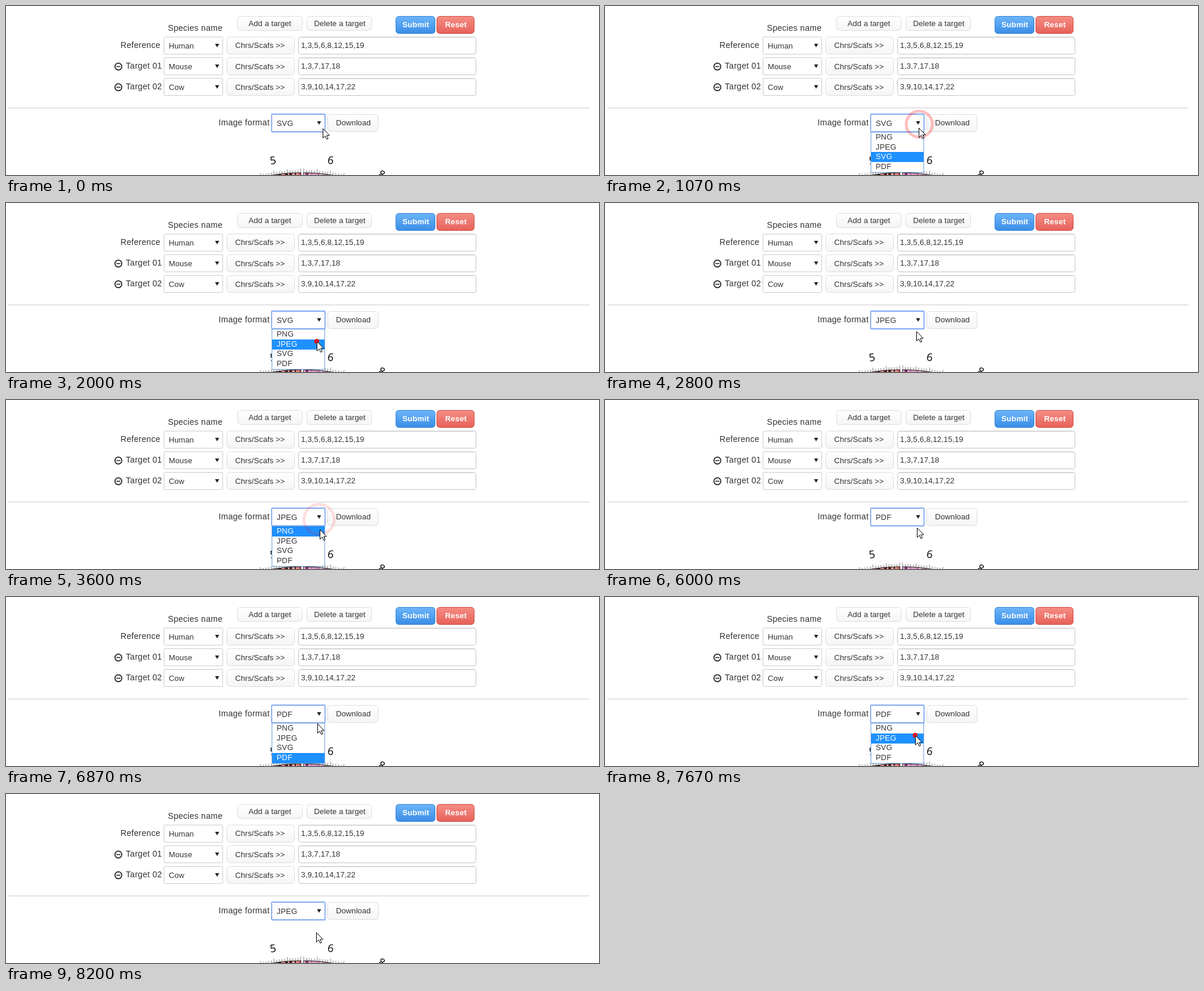
An HTML page for the animation above (8.27 s loop, 1000 by 286 pixels).

```html
<!DOCTYPE html>
<html lang="en">
<head>
<meta charset="utf-8">
<title>Image format picker</title>
<style>
  html, body { margin: 0; width: 100%; height: 100%; overflow: hidden; background: #fff; }
  svg { display: block; width: 1000px; height: 286px; }
  text { font: 13px "Liberation Sans", Arial, sans-serif; letter-spacing: .1px; fill: #333; white-space: pre; }
  .label { font-size: 14px; letter-spacing: .3px; }
  .strong { font-weight: bold; letter-spacing: .2px; fill: #fff; }
  .option { letter-spacing: .2px; }
  .chart { font: 18px "Noto Sans", "Open Sans", sans-serif; fill: #111; text-anchor: middle; }
</style>
</head>
<body>
<svg id="stage" viewBox="0 0 1000 286">
  <defs>
    <linearGradient id="plain" x2="0" y2="1"><stop stop-color="#fff"/><stop offset="1" stop-color="#f5f5f5"/></linearGradient>
    <linearGradient id="blue" x2="0" y2="1"><stop stop-color="#6cb5f9"/><stop offset="1" stop-color="#3a8de6"/></linearGradient>
    <linearGradient id="red" x2="0" y2="1"><stop stop-color="#f58d84"/><stop offset="1" stop-color="#e6625a"/></linearGradient>
  </defs>
  <g id="chart"></g>
  <g id="form"></g>
  <g id="list"></g>
  <circle id="ring" fill="none" stroke="#f00" stroke-width="5"/>
  <path id="cursor" d="M.5 .5V16.5L4.3 13L6.8 18.5L9.2 17.4L6.8 12H11.5Z" fill="#fff" stroke="#000"/>
</svg>
<script>
const byId = id => document.getElementById(id);

function add(parent, tag, attrs, content = '') {
  const node = document.createElementNS('http://www.w3.org/2000/svg', tag);
  for (const key in attrs) node.setAttribute(key, attrs[key]);
  node.textContent = content;
  parent.append(node);
  return node;
}

const chart = byId('chart'), form = byId('form'), list = byId('list');
const write = (x, y, content, cls = '') => add(form, 'text', { x, y, class: cls }, content);
const box = (x, y, width, height, rx, fill, stroke) =>
  add(form, 'rect', { x: x + .5, y: y + .5, width: width - 1, height: height - 1, rx, fill, stroke });

function button(x, y, width, height, textX, baseline, label, fill = 'url(#plain)', stroke = '#ddd', cls = '') {
  box(x, y, width, height, 5, fill, stroke);
  write(textX, baseline, label, cls);
}

const arrow = (x, y) => add(form, 'path', { d: `M${x} ${y}h7l-3.5 6z`, fill: '#222' });

// Circular chart, only its top edge is on stage
const CX = 499.5, CY = 603;
function spoke(degrees, inner, outer, stroke, width) {
  const a = degrees * Math.PI / 180, s = Math.sin(a), c = Math.cos(a);
  add(chart, 'line', { x1: CX + inner * s, y1: CY - inner * c, x2: CX + outer * s, y2: CY - outer * c, stroke, 'stroke-width': width });
}

function drawChart() {
  let seed = 7;
  const random = () => (seed = seed * 16807 % 2147483647) / 2147483647;
  const palettes = { '-1': ['#b8403f', '#e58a86', '#f0b4ae', '#3a1010', '#d0605c'], 1: ['#b0559a', '#dca0c8', '#eabcd8', '#70305f', '#d080b8'] };
  for (const side of [-1, 1]) {
    for (let a = .55; a < 9.5; a += .4) {
      spoke(side * a, 305, 321, palettes[side][Math.floor(random() * 5)], 2.4);
    }
    for (let i = 0; i < 17; i++) spoke(side * (.45 + i * .8), 321, i % 5 ? 325.5 : 328, '#777', .9);
    const x = a => CX + side * 321 * Math.sin(a), y = a => CY - 321 * Math.cos(a);
    add(chart, 'path', {
      d: `M${x(.007)} 290V${y(.007)}A321 321 0 0 ${side > 0 ? 1 : 0} ${x(.17)} ${y(.17)}`,
      fill: 'none', stroke: '#222', 'stroke-width': 1
    });
  }
  for (const [digit, degrees] of [['3', -26], ['5', -8.2], ['6', 8], ['8', 22.9]]) {
    add(chart, 'text', { class: 'chart', transform: `rotate(${degrees} ${CX} ${CY})`, x: CX, y: CY - 339 }, digit);
  }
}

function drawForm() {
  write(273, 42, 'Species name', 'label');
  button(390, 17, 110, 25, 409, 34, 'Add a target');
  button(507, 17, 110, 25, 519.5, 34, 'Delete a target');
  button(657, 17, 67, 30, 668.5, 36, 'Submit', 'url(#blue)', '#3683d6', 'strong');
  button(726, 17, 64, 30, 740.5, 36, 'Reset', 'url(#red)', '#cf4a43', 'strong');

  const rows = [
    ['Reference', 'Human', '1,3,5,6,8,12,15,19'],
    ['Target 01', 'Mouse', '1,3,7,17,18'],
    ['Target 02', 'Cow', '3,9,10,14,17,22']
  ];
  rows.forEach(([label, species, numbers], i) => {
    const y = 52 + 35 * i;
    write(i ? 202 : 193, y + 19, label, 'label');
    if (i) add(form, 'path', { d: `M183.7 ${y + 15.5}a5.8 5.8 0 1 1 11.6 0a5.8 5.8 0 1 1 -11.6 0M186 ${y + 15.5}h7`, fill: 'none', stroke: '#222', 'stroke-width': 1.7 });
    box(266, y, 100, 30, 1, '#fff', '#ccc');
    write(274.5, y + 20, species);
    arrow(352.5, y + 12);
    button(372, y, 115, 30, 386.5, y + (i ? 20 : 19), 'Chrs/Scafs >>');
    box(493, y, 300, 30, 3, '#fff', '#c4c4c4');
    add(form, 'path', { d: `M495 ${y + 1.5}h296`, stroke: '#e9e9e9' });
    write(497.5, y + 19, numbers);
  });

  add(form, 'path', { d: 'M4 172.5H984', stroke: '#ccc' });
  write(358.5, 202, 'Image format', 'label');
  add(form, 'rect', { x: 448, y: 183, width: 90, height: 30, rx: 1, fill: '#fff', stroke: '#84aaf0', 'stroke-width': 1.8 });
  arrow(524.5, 195);
  button(542, 183, 86, 30, 556.5, 202, 'Download');
}

drawChart();
drawForm();
const valueText = write(456.5, 203, '', 'option');

// Drop-down list
const FORMATS = ['PNG', 'JPEG', 'SVG', 'PDF'], LIST_TOP = 214, ROW = 16.7;
add(list, 'rect', { x: 448.5, y: 213.5, width: 89, height: 68, fill: '#fff', stroke: '#6d9fdc' });
const highlight = add(list, 'rect', { x: 449, width: 88, height: 17, fill: '#1e90ff' });
const options = FORMATS.map((name, i) => add(list, 'text', { x: 456.5, y: Math.round(226 + ROW * i), class: 'option' }, name));

// Timeline in ticks of 1/15 s
const LOOP = 8270;
const PATH = [ // tick, x, y
  [0, 534, 207], [4, 534, 207], [5, 530, 201], [7, 530, 201], [8, 530, 200], [15, 530, 200],
  [16, 529, 206], [19, 527, 220], [21, 527, 220], [23, 524, 234], [38, 524, 234],
  [42, 525, 217], [46, 528, 202], [51, 528, 202], [54, 529, 219], [55, 529, 221],
  [65, 529, 259], [68, 529, 259], [72, 529, 267], [86, 529, 267], [91, 525, 203],
  [94, 525, 203], [95, 527, 201], [100, 527, 201], [103, 525, 214], [106, 525, 222],
  [107, 525, 222], [111, 523, 234], [124, 523, 234]
];
const CLICKS = [10, 30, 47, 76, 95, 115];  // alternately open and close the list
const VALUES = ['SVG', 'JPEG', 'PDF', 'JPEG'];

function cursorAt(tick) {
  const next = Math.max(1, PATH.findIndex(([time]) => time >= tick));
  const [t0, x0, y0] = PATH[next - 1], [t1, x1, y1] = PATH[next];
  const p = (tick - t0) / (t1 - t0);
  return [Math.round(x0 + (x1 - x0) * p), Math.round(y0 + (y1 - y0) * p)];
}

function draw(ms) {
  const tick = Math.min(123, Math.floor((ms % LOOP + 4) * .015));
  const [x, y] = cursorAt(tick);
  byId('cursor').setAttribute('transform', `translate(${x} ${y})`);

  const done = CLICKS.filter(click => tick > click).length;
  const value = VALUES[done >> 1];
  valueText.textContent = value;
  list.style.display = done % 2 ? '' : 'none';
  const active = y > LIST_TOP ? Math.min(3, Math.floor((y - LIST_TOP) / ROW)) : FORMATS.indexOf(value);
  highlight.setAttribute('y', Math.round(LIST_TOP + ROW * active));
  options.forEach((option, i) => option.style.fill = i === active ? '#fff' : '#333');

  const click = CLICKS.find(c => tick >= c && tick < c + 8);
  const ring = byId('ring');
  ring.style.display = click === undefined ? 'none' : '';
  if (click !== undefined) {
    const age = tick - click, [cx, cy] = cursorAt(click);
    ring.setAttribute('cx', cx);
    ring.setAttribute('cy', cy);
    ring.setAttribute('r', 1.5 + age * 24 / 7);
    ring.setAttribute('opacity', 1 - age / 8);
  }
}

const start = performance.now();
function frame() {
  draw(performance.now() - start);
  requestAnimationFrame(frame);
}
frame();
</script>
</body>
</html>
```
